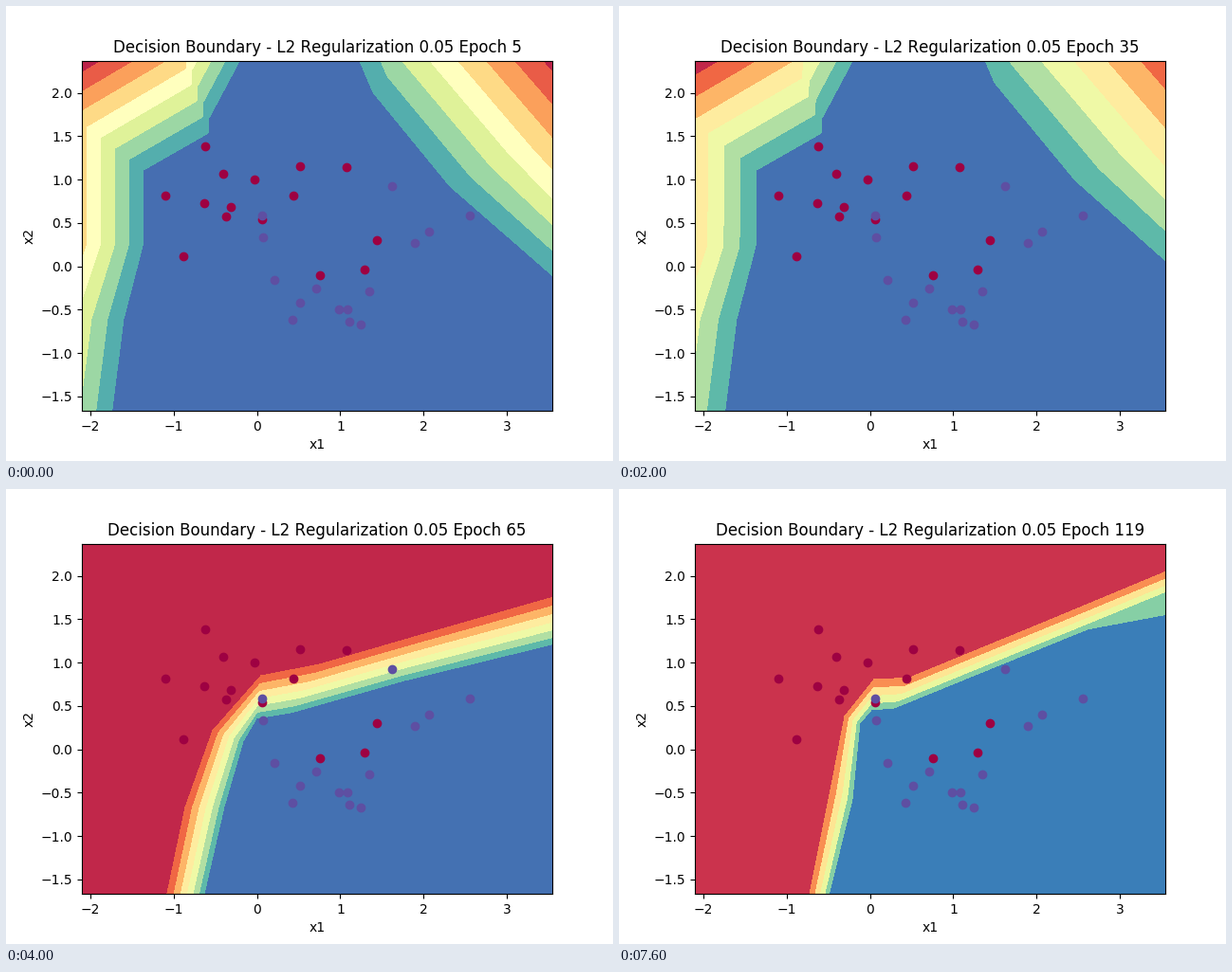
A matplotlib script for the animation above (8 s loop, 640 by 480 pixels).

```python
import numpy as np
import matplotlib.pyplot as plt
from matplotlib.animation import FuncAnimation
from matplotlib.patches import Polygon

FRAMES, INTERVAL = 20, 400
X_RANGE, Y_RANGE = (-2.105, 3.549), (-1.669, 2.374)
SPECTRAL = plt.get_cmap("Spectral")
plt.rcParams["text.kerning_factor"] = 6


def pts(*flat):
    return np.array(flat, float).reshape(-1, 2)


def to_data(pixels):
    """Stage pixels (y down) to axes coordinates."""
    x = X_RANGE[0] + (pixels[:, 0] - 80) / 496 * (X_RANGE[1] - X_RANGE[0])
    y = Y_RANGE[1] - (pixels[:, 1] - 57.6) / 369.6 * (Y_RANGE[1] - Y_RANGE[0])
    return np.column_stack([x, y])


def mix(a, b, t):
    return a + (b - a) * t


def ease_out(t, power):
    return 1 - (1 - np.clip(t, 0, 1)) ** power


# Each phase is one level line and the way its neighbours step away from it.
LEFT = pts(331, -101, 214, 118, 213, 134, 145, 173, 144, 253, 124, 330, 110, 440)
LEFT_STEP = pts(-6, -17, -6, -17, -6, -17, -15, -11.5, -15, 0, -17, 0, -17, 0)
RIGHT = pts(370, 51, 387, 91, 468, 190, 640, 340)
RIGHT_STEP = pts(15, -17, 15, -17, 21.5, -10.5, 0, -24.5)

FAN_BLUE = pts(640, 142, 557, 137, 420, 211, 287, 283, 286, 283, 264, 350, 240, 440)
FAN_RED = pts(640, -386, 557, -391, 414, -252, 272, -113, -19, 270, -35, 350, -50, 440)
FAN_POWER = np.array([[1], [1], [1], [1], [1.25], [1.25], [1.25]])

WIDE_BLUE = pts(640, 148, 420, 202, 300, 236, 264, 242, 250, 266, 230, 335, 206, 440)
WIDE_RED = pts(640, 95, 430, 155, 330, 184, 268, 196, 217, 254, 188, 335, 166, 440)
SLIM_BLUE = pts(640, 109, 494, 161, 290, 234, 266, 236, 254, 250, 246, 330, 219, 440)
SLIM_RED = pts(640, 80, 460, 146, 305, 202, 268, 203, 237, 242, 222, 320, 198, 440)

RED_DOTS = pts(210, 148, 229, 177, 262, 183, 310, 169, 359, 170, 303, 200, 168, 200,
               209, 208, 237, 212, 232, 222, 270, 225, 187, 264, 331, 284, 378, 278,
               391, 247)
BLUE_DOTS = pts(270, 221, 271, 244, 407, 190, 489, 221, 446, 238, 431, 250, 283, 289,
                327, 298, 310, 313, 383, 301, 302, 331, 351, 320, 360, 320, 362, 333,
                374, 336)


def band_count(i):
    return 9 if i == 0 else 8 if i < 13 else 6


def fractions(i):
    return np.linspace(0, 1, band_count(i) - 1)


def corner_lines(i, base, step, offset, spread):
    scale = 1 if i == 0 else spread
    return [base + step * (offset + k * scale) for k in range(band_count(i) - 1)]


def left_lines(i):
    return corner_lines(i, LEFT, LEFT_STEP, np.interp(i, [0, 3, 5], [0, 1.1, 0]), 1.14)


def right_lines(i):
    offset = np.interp(i, [0, 3, 5, 6], [0, 1.85, .6, 4])
    return corner_lines(i, RIGHT, RIGHT_STEP, offset, 1.17)


def fan_lines(i):
    return [mix(FAN_BLUE, FAN_RED, f ** FAN_POWER) for f in fractions(i)]


def ribbon_lines(i):
    slim = ease_out((i - 10) / 6, 2)
    drift = max(i - 16, 0) / 3
    blue, red = mix(WIDE_BLUE, SLIM_BLUE, slim), mix(WIDE_RED, SLIM_RED, slim)
    lines = [mix(blue, red, f ** 1.1) for f in fractions(i)]
    lines[0][0, 1] += 32 * slim  # wedge beside the blue area
    for line in lines:
        line[:, 1] -= drift * (3 + .05 * np.maximum(line[:, 0] - 290, 0))
    return lines


def main_lines(i):
    if i < 6:
        return left_lines(i)
    if i == 6:
        return mix(np.array(left_lines(i)), np.array(fan_lines(i)), .5)
    if i < 10:
        t = ease_out((i - 7) / 3, 3)
        return mix(np.array(fan_lines(i)), np.array(ribbon_lines(i)), t)
    return ribbon_lines(i)


def close_region(line, side_x):
    corner = pts(side_x, line[-1, 1], side_x, -600, line[0, 0], -600)
    return to_data(np.vstack([line, corner]))


fig, ax = plt.subplots(figsize=(6.4, 4.8), dpi=100)
ax.set(xlim=X_RANGE, ylim=Y_RANGE, xlabel="x1", ylabel="x2")
for dots, shade in ((RED_DOTS, 0.0), (BLUE_DOTS, 1.0)):
    ax.scatter(*to_data(dots).T, color=SPECTRAL(shade), zorder=2)
regions = []


def draw(i):
    while regions:
        regions.pop().remove()
    count = band_count(i)

    def band_color(level):
        return SPECTRAL((count - level - .5) / count)

    ax.set_facecolor(band_color(0))
    groups = [(main_lines(i), -300)]
    if i < 7:
        groups.append((right_lines(i), 900))
    for lines, side_x in groups:
        for level, line in enumerate(lines, 1):
            patch = Polygon(close_region(line, side_x), facecolor=band_color(level),
                            linewidth=0, antialiased=False, zorder=1)
            regions.append(ax.add_patch(patch))
    ax.set_title(f"Decision Boundary - L2 Regularization 0.05 Epoch {5 + 6 * i}")
    return regions


anim = FuncAnimation(fig, draw, frames=FRAMES, interval=INTERVAL,
                     init_func=lambda: draw(0), repeat=True)
plt.show()
```
